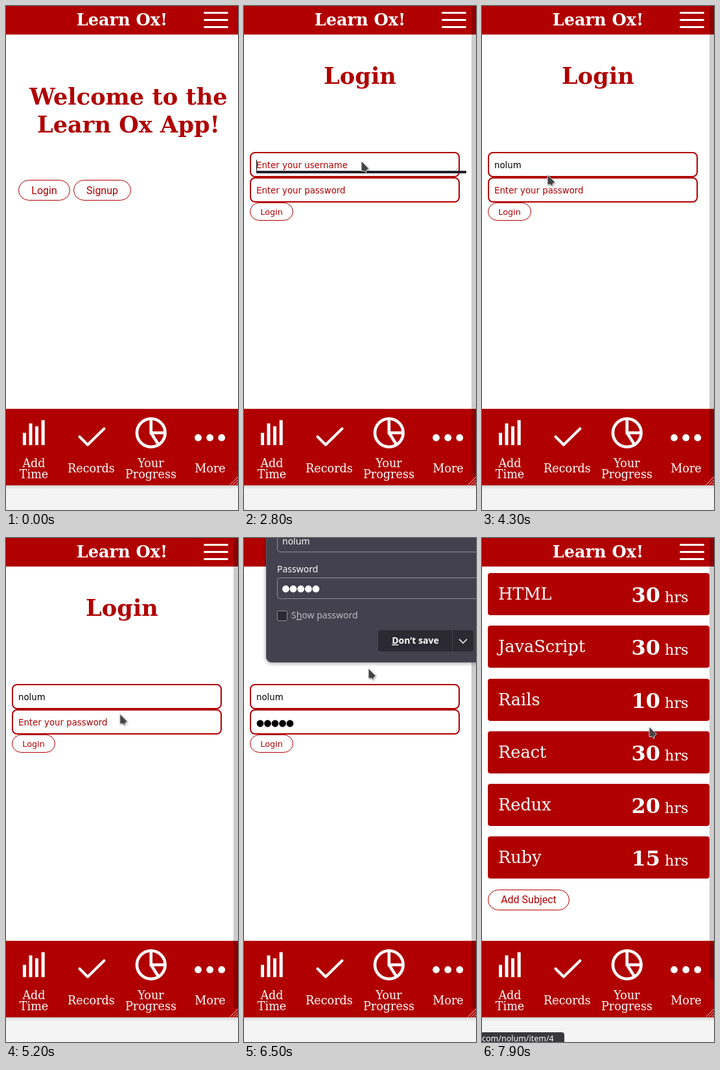
These frames come from a looping animation (358 by 777 pixels, 8 s). An HTML page:

```html
<!DOCTYPE html>
<html lang="en">
<head>
<meta charset="utf-8">
<title>Study timer</title>
<style>
  /* Clock in tenths of a second; --on and --off give each part its time window. */
  @property --t { syntax: "<integer>"; inherits: true; initial-value: 0; }
  @keyframes clock { from { --t: 0; } to { --t: 80; } }

  html, body { margin: 0; width: 100%; height: 100%; overflow: hidden; background: #fff; }
  svg { display: block; width: 358px; height: 777px; animation: clock 8s steps(80) infinite; --red: #b00000; }
  .when { --on: 0; --off: 80; opacity: calc(min(var(--t) - var(--on) + 1, var(--off) - var(--t))); }

  text { white-space: pre; }
  .serif { font-family: "DejaVu Serif", serif; }
  .sans { font: 13.333px "DejaVu Sans", sans-serif; }
  .roboto { font: 16px Roboto, sans-serif; }
  .noto { font: 14px "Noto Sans", sans-serif; }
  .bold { font-weight: bold; }
  .mid { text-anchor: middle; }
  .h1 { font-size: 35.2px; }
  .h2 { font-size: 25.6px; }
  .nav { font-size: 17.6px; }
  .num { font-size: 32px; }
  .unit { font-size: 22.4px; }
  .red { fill: var(--red); }
  .white { fill: #fff; }
  .pill { fill: #fff; stroke: var(--red); }
  .field { fill: #fff; stroke: var(--red); stroke-width: 2; }
  .line { fill: none; stroke: #fff; }
  .box { fill: #42414d; stroke: #8f8f9d; }
  .dark { fill: #2b2a33; }

  #cursor { animation: move 8s infinite; filter: drop-shadow(1px 1px 1px rgba(0, 0, 0, .35)); }
  @keyframes move {
    0%, 2.5% { transform: translate(203px, 229px); animation-timing-function: steps(4); }
    7.5%, 10% { transform: translate(30px, 283px); animation-timing-function: steps(4); }
    15% { transform: translate(265px, 133px); animation-timing-function: steps(4); }
    20% { transform: translate(173px, 202px); animation-timing-function: steps(4); }
    25%, 42.5% { transform: translate(181px, 239px); animation-timing-function: steps(3); }
    46.25%, 47.5% { transform: translate(118px, 165px); animation-timing-function: steps(5); }
    53.75% { transform: translate(101px, 260px); animation-timing-function: steps(1); }
    55% { transform: translate(99px, 277px); animation-timing-function: steps(1); }
    56.25%, 58.75% { transform: translate(99px, 272px); animation-timing-function: steps(6); }
    66.25%, 71.25% { transform: translate(191px, 271px); animation-timing-function: steps(4); }
    76.25% { transform: translate(235px, 223px); animation-timing-function: steps(1); }
    77.5%, 78.75% { transform: translate(226px, 205px); animation-timing-function: steps(2); }
    81.25%, 82.5% { transform: translate(192px, 201px); animation-timing-function: steps(7); }
    91.25%, 93.75% { transform: translate(262px, 170px); animation-timing-function: steps(4); }
    98.75%, 100% { transform: translate(258px, 291px); }
  }
</style>
</head>
<body>
<svg viewBox="0 0 358 777">
  <defs>
    <linearGradient id="shade" x2="0" y2="1">
      <stop stop-color="#d4d4d4"/><stop offset="1" stop-color="#f4f4f4"/>
    </linearGradient>
    <g id="dot"><circle r="5.4"/></g>
  </defs>
  <rect width="358" height="777" fill="#fff"/>

  <!-- Header -->
  <rect class="red" width="358" height="44"/>
  <text class="serif bold h2 white mid" x="179" y="30">Learn Ox!</text>
  <path class="line" stroke-width="3" stroke-linecap="round" d="M306.5 10.5h35M306.5 21.5h35M306.5 32.5h35"/>

  <!-- Welcome page -->
  <g class="when" style="--off:8">
    <g class="serif bold h1 red mid">
      <text x="189" y="152">Welcome to the</text>
      <text x="189" y="195">Learn Ox App!</text>
    </g>
    <rect class="pill" x="19.5" y="268.5" width="79" height="31" rx="16"/>
    <rect class="pill" x="104.5" y="268.5" width="88" height="31" rx="16"/>
    <g class="roboto red mid">
      <text x="59" y="290">Login</text>
      <text x="148.5" y="290">Signup</text>
    </g>
  </g>

  <!-- Login page -->
  <g class="when" style="--on:8;--off:67">
    <text class="serif bold h1 red mid" x="179" y="120">Login</text>
    <rect class="field" x="10" y="226" width="322" height="37" rx="7"/>
    <rect class="field" x="10" y="265" width="322" height="37" rx="7"/>
    <rect class="pill" x="9.5" y="303.5" width="66" height="27" rx="14"/>
    <text class="sans red mid" style="font-size:12.8px" x="42.5" y="322">Login</text>
    <g class="sans">
      <text class="when red" style="--off:39" x="19" y="250">Enter your username</text>
      <text class="when" style="--on:39;--off:40" x="19" y="250">n</text>
      <text class="when" style="--on:40;--off:41" x="19" y="250">no</text>
      <text class="when" style="--on:41;--off:42" x="19" y="250">nol</text>
      <text class="when" style="--on:42" x="19" y="250">nolum</text>
      <text class="when red" style="--off:56" x="19" y="289">Enter your password</text>
    </g>
    <use class="when" style="--on:56" href="#dot" x="25" y="286"/>
    <use class="when" style="--on:56" href="#dot" x="36.5" y="286"/>
    <use class="when" style="--on:58" href="#dot" x="48" y="286"/>
    <use class="when" style="--on:59" href="#dot" x="59.5" y="286"/>
    <use class="when" style="--on:60" href="#dot" x="71" y="286"/>
    <rect class="when" style="--on:28;--off:31" x="19" y="237" width="1" height="17"/>
    <rect class="when" style="--on:28;--off:29" x="19" y="254" width="324" height="4" fill="#23222b"/>
    <rect class="when" style="--on:29;--off:31" x="19" y="254" width="324" height="124" fill="#23222b"/>
    <rect class="when" style="--on:39;--off:40" x="19" y="254" width="324" height="4" fill="#23222b"/>
  </g>

  <!-- Subjects page -->
  <g class="when" style="--on:67">
    <g id="cards"></g>
    <rect class="pill" x="9.5" y="542.5" width="125" height="31" rx="16"/>
    <text class="roboto red mid" x="72" y="563">Add Subject</text>
  </g>

  <!-- Bottom bar -->
  <rect y="739" width="358" height="38" fill="#f4f4f4"/>
  <rect y="739" width="358" height="6" fill="url(#shade)"/>
  <rect class="red" y="621" width="358" height="118"/>
  <path class="white" d="M26 658h5v19h-5zM35.5 643.5h5V677h-5zM45 648h5v29h-5zM54.7 638.5h5V677h-5z"/>
  <path class="line" stroke-width="4" stroke-linecap="round" stroke-linejoin="round" d="M113.5 664L126 676.5L151.5 651.5"/>
  <g class="line" stroke-width="4.6">
    <circle cx="223.8" cy="658" r="21.8"/>
    <path d="M223.8 636v22h22M223.8 658l12 19"/>
  </g>
  <g class="white">
    <use href="#dot" x="296.5" y="665.5"/>
    <use href="#dot" x="314.7" y="665.5"/>
    <use href="#dot" x="332.8" y="665.5"/>
  </g>
  <g class="serif nav white mid">
    <text x="43" y="711">Add</text>
    <text x="43" y="728">Time</text>
    <text x="131.5" y="719">Records</text>
    <text x="223.5" y="711">Your</text>
    <text x="223.5" y="728">Progress</text>
    <text x="315" y="719">More</text>
  </g>
  <path class="line" stroke-opacity=".75" d="M345.5 738.5l12.5-12.5M350 738.5l8-8M354.5 738.5l3.5-3.5"/>

  <!-- Scrollbar -->
  <rect class="when" style="--on:8;--off:67" x="351" y="1" width="7" height="724" fill-opacity=".2"/>
  <rect class="when" style="--on:67" x="351" y="1" width="7" height="679" fill-opacity=".2"/>

  <!-- Save password prompt -->
  <g class="when" style="--on:62;--off:74">
    <path d="M34.5 -1V183.500a8 8 0 0 0 8 8H359V-1z" fill="#42414d" stroke="#5b5a66"
      style="filter:drop-shadow(0 1px 3px rgba(0,0,0,.4))"/>
    <rect class="box" x="51.500" y="-12.500" width="330" height="34" rx="4"/>
    <rect class="box" x="51.500" y="61.500" width="330" height="32" rx="4"/>
    <rect class="box" style="fill:#2b2a33" x="51.500" y="112.500" width="15" height="15" rx="2"/>
    <g class="noto" fill="#fbfbfe">
      <text x="59" y="10">nolum</text>
      <text x="51" y="53">Password</text>
      <text x="73" y="124" fill="#bdbcc3">S<tspan text-decoration="underline">h</tspan>ow password</text>
    </g>
    <g class="white">
      <use href="#dot" x="64.500" y="78.500"/>
      <use href="#dot" x="76" y="78.500"/>
      <use href="#dot" x="87.700" y="78.500"/>
      <use href="#dot" x="99.400" y="78.500"/>
      <use href="#dot" x="111" y="78.500"/>
    </g>
    <path class="dark" d="M211 142h110v33h-110a4 4 0 0 1-4-4v-25a4 4 0 0 1 4-4z"/>
    <path class="when" style="--on:72" fill="#5b5b62" d="M211 142h110v33h-110a4 4 0 0 1-4-4v-25a4 4 0 0 1 4-4z"/>
    <path class="dark" d="M322 142h28a4 4 0 0 1 4 4v25a4 4 0 0 1-4 4h-28z"/>
    <path class="line" stroke-width="1.500" d="M332 156l6 6l6-6"/>
    <text class="noto bold white mid" style="font-weight:bold" x="264.500" y="163"><tspan text-decoration="underline">D</tspan>on’t save</text>
  </g>

  <!-- Link status -->
  <g class="when" style="--on:77">
    <path d="M0 762h123a4 4 0 0 1 4 4v11H0z" fill="#38383d"/>
    <text class="noto white" style="font-size:12.500px" x="0" y="776">com/nolum/item/4</text>
  </g>

  <g class="when" style="--on:2">
    <path id="cursor" fill="#444" stroke="#eee" stroke-width=".9" d="M0 0V15.500L4.500 15L7.500 18.500L8.200 14L11.500 11.500z"/>
  </g>
</svg>
<script>
  const subjects = { HTML: 30, JavaScript: 30, Rails: 10, React: 30, Redux: 20, Ruby: 15 };
  document.getElementById("cards").innerHTML = Object.entries(subjects).map(([name, hours], i) => `
    <g class="serif white" transform="translate(0 ${Math.round(54 + 81.25 * i)})">
      <rect class="red" x="9" width="342" height="65" rx="4"/>
      <text class="h2" x="25" y="41">${name}</text>
      <text class="num bold" x="230.5" y="45">${hours}</text>
      <text class="unit" x="282" y="45">hrs</text>
    </g>`).join("");
</script>
</body>
</html>
```
